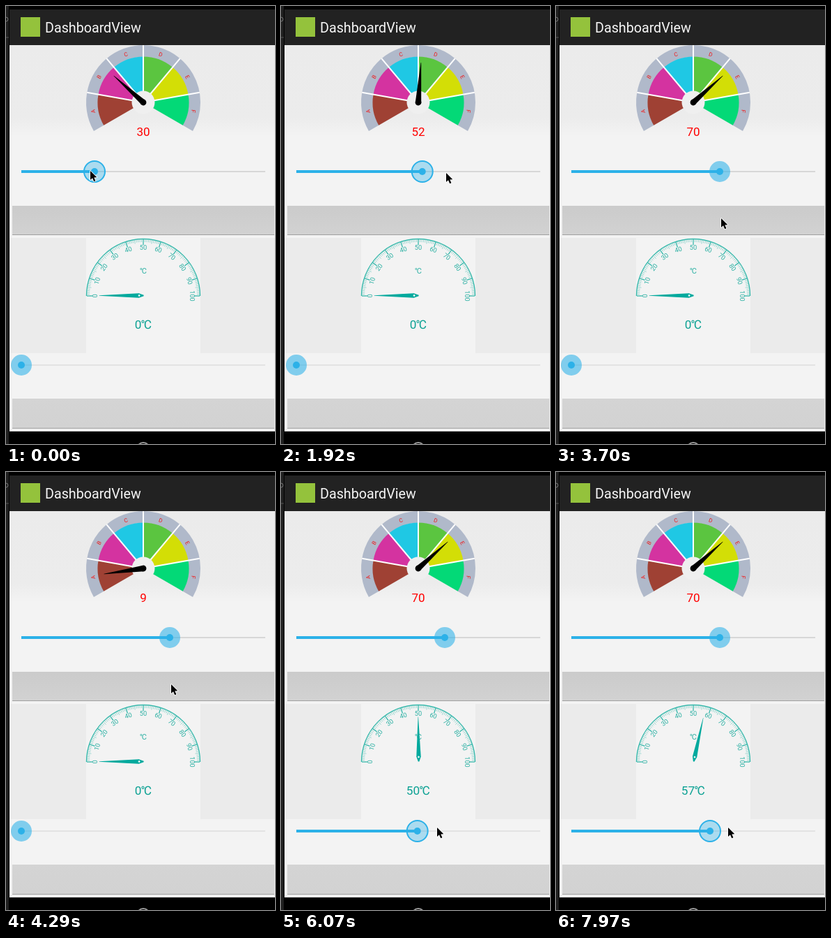
Write an HTML page with a canvas that moves like this. It is 386 px wide and 627 px high and loops after 8000 ms.

```html
<!DOCTYPE html>
<html lang="en">
<head>
<meta charset="utf-8">
<title>Dashboard gauges</title>
<style>
  html, body { margin: 0; width: 100%; height: 100%; overflow: hidden; background: #000; }
  canvas { display: block; width: 386px; height: 627px; }
</style>
</head>
<body>
<canvas id="stage"></canvas>
<script>
const W = 386, H = 627, LOOP = 8000, TICK = 147.6;
const FONT = 'Roboto, "Noto Sans", "Noto Sans CJK SC", sans-serif';
const BLUE = '#2cb1e8', TEAL = '#00a99d', RIM = '#35b8ab';
const canvas = document.getElementById('stage');
const ctx = canvas.getContext('2d');
const dpr = window.devicePixelRatio || 1;
canvas.width = W * dpr;
canvas.height = H * dpr;

// Turning points as [tick, position]; the motion eases from one to the next.
const thumb1 = [[0, 127], [4, 53], [8, 211], [11, 106], [14, 235]];
const thumb2 = [[37, 22], [42, 214], [44, 106], [47, 237], [51, 95], [54, 221]];
const mouseX = [[0, 121], [3, 53], [6.6, 224], [9.6, 106], [13, 237], [29, 237], [33, 60],
  [36, 25], [37, 25], [41, 224], [43, 106], [46, 245], [50, 95], [54, 247]];
const mouseY = [[0, 236], [8, 239], [14, 239], [16, 304], [29, 304], [33, 545], [36, 509]];
const PRESSES = [17, 27];

const rad = deg => deg * Math.PI / 180;
const percent = x => (x - 22) / 3.5;
const ease = u => (1 - Math.cos(Math.PI * Math.min(1, Math.max(0, u)))) / 2;

function swing(points, t) {
  const next = points.findIndex(p => p[0] > t);
  if (next < 0) return points[points.length - 1][1];
  if (next === 0) return points[0][1];
  const [a, va] = points[next - 1], [b, vb] = points[next];
  return va + (vb - va) * ease((t - a) / (b - a));
}

// Each press of the button runs the needle from 0 to 70.
function needleValue(t, x) {
  const press = PRESSES.filter(p => p < t).pop();
  return press ? 70 * ease((t - press - .4) / 6.8) : percent(x);
}

function rect(x, y, w, h, fill) {
  ctx.fillStyle = fill;
  ctx.fillRect(x, y, w, h);
}

function disc(x, y, r, fill) {
  ctx.fillStyle = fill;
  ctx.beginPath();
  ctx.arc(x, y, r, 0, 2 * Math.PI);
  ctx.fill();
}

function arc(x, y, r, from, to, color, width) {
  ctx.strokeStyle = color;
  ctx.lineWidth = width;
  ctx.beginPath();
  ctx.arc(x, y, r, rad(from), rad(to));
  ctx.stroke();
}

function line(x1, y1, x2, y2, color, width) {
  ctx.strokeStyle = color;
  ctx.lineWidth = width;
  ctx.beginPath();
  ctx.moveTo(x1, y1);
  ctx.lineTo(x2, y2);
  ctx.stroke();
}

function poly(points, fill) {
  ctx.fillStyle = fill;
  ctx.beginPath();
  points.forEach(([x, y]) => ctx.lineTo(x, y));
  ctx.closePath();
  ctx.fill();
}

function text(s, x, y, size, color, align = 'center') {
  ctx.font = `${size}px ${FONT}`;
  ctx.textAlign = align;
  ctx.fillStyle = color;
  ctx.fillText(s, x, y);
}

function gradient(y1, y2, ...stops) {
  const g = ctx.createLinearGradient(0, y1, 0, y2);
  stops.forEach(([p, c]) => g.addColorStop(p, c));
  return g;
}

// Draws with the x axis along the given angle.
function turned(x, y, deg, draw) {
  ctx.save();
  ctx.translate(x, y);
  ctx.rotate(rad(deg));
  draw();
  ctx.restore();
}

function rimText(s, x, y, deg, r, size, color) {
  turned(x, y, deg + 90, () => text(s, 0, -r, size, color));
}

function backdrop() {
  rect(0, 0, W, H, '#000');
  rect(0, 0, 4, H, '#202020');
  arc(0, 19, 3, -90, 90, '#777', 1);
  line(0, 45, 4, 45, '#555', 1);
  rect(5, 5, 381, 51, '#222');
  rect(21, 16, 28, 28, '#94c23c');
  text('DashboardView', 56, 38, 19.7, '#f5f5f5', 'left');
  rect(5, 56, 381, 553, '#f3f3f3');
  rect(5, 56, 381, 130, gradient(56, 186, [0, '#ebebeb'], [.8, '#ececec'], [1, '#f3f3f3']));
  rect(5, 332, 110, 165, '#ebebeb');
  rect(279, 332, 107, 165, '#ebebeb');
  arc(197, 634, 9, 180, 360, '#9a9a9a', 2);
}

function button(y, h, top, bottom, pressed) {
  if (pressed) {
    ctx.fillStyle = '#a5d7ec';
    ctx.beginPath();
    ctx.roundRect(5, y - 5, 384, h + 9, 3);
    ctx.fill();
  }
  rect(9, y, 376, h, pressed ? '#45b9ea' : gradient(y, y + h, [0, top], [1, bottom]));
  rect(9, y + h - 1, 376, 1, pressed ? '#3a9bc6' : '#a0a0a0');
}

function slider(x, y, pressed, track) {
  line(22, y, 372, y, track, 1.4);
  line(22, y, x, y, BLUE, 4);
  disc(x, y, 15, `rgba(44, 177, 232, ${pressed ? .36 : .58})`);
  if (pressed) arc(x, y, 15, 0, 360, BLUE, 2);
  disc(x, y, 5, BLUE);
}

function colorGauge(value) {
  const x = 197, y = 138;
  const colors = ['#9f4134', '#d433a0', '#1fc8e4', '#5bc540', '#d3de06', '#03d977'];
  arc(x, y, 73.5, 150, 390, '#b0b9ca', 17);
  colors.forEach((c, i) => {
    const from = 150 + 40 * i;
    arc(x, y, 38, from, from + 40, c, 55);
    rimText('ABCDEF'[i], x, y, from + 20, 70.3, 8, '#f01818');
  });
  for (let a = 190; a < 390; a += 40) {
    turned(x, y, a, () => line(0, 0, 82, 0, '#fff', 2));
  }
  disc(x, y, 16.5, '#efefef');
  turned(x, y, 150 + 2.4 * value, () => {
    poly([[0, -4.2], [57, -.3], [57, .3], [0, 4.2]], '#000');
    disc(0, 0, 4.4, '#000');
  });
  text(Math.round(value), x, 185.5, 17, '#f00');
}

function scaleGauge(value) {
  const x = 197, y = 415;
  arc(x, y, 81.5, 180, 360, RIM, 1.4);
  for (let i = 0; i <= 100; i++) {
    const major = i % 10 === 0;
    const size = major ? 8 : i % 5 === 0 ? 5.5 : 4;
    const angle = 180 + 1.8 * i;
    turned(x, y, angle, () =>
      line(81 - size, 0, 81, 0, major ? RIM : '#8ad2ca', major ? 1.3 : .8));
    if (major) rimText(i, x, y, angle, 66.5, 9.2, '#2bb0a3');
  }
  text('℃', x, 383, 11, '#2bb0a3');
  turned(x + .6, y - .5, 180 + 1.8 * value, () => {
    poly([[0, -.8], [7, -3.2], [64, -.2], [64, .2], [7, 3.2], [0, .8]], TEAL);
    disc(6.5, 0, 1.4, '#e4f4f2');
  });
  text(Math.round(value) + '℃', x, 462, 17.2, '#0ba193');
}

function cursor(x, y) {
  ctx.save();
  ctx.translate(x, y);
  ctx.scale(.93, .93);
  ctx.strokeStyle = '#fff';
  ctx.lineWidth = 1.8;
  ctx.lineJoin = 'round';
  poly([[0, 0], [0, 14], [3.2, 11], [5.6, 16.4], [8, 15.4], [5.7, 10.2], [10, 10]], '#000');
  ctx.stroke();
  ctx.fill();
  ctx.restore();
}

function draw(ms) {
  const t = Math.floor((ms + 8) / TICK);
  const x1 = swing(thumb1, t), x2 = swing(thumb2, t);
  ctx.setTransform(dpr, 0, 0, dpr, 0, 0);
  backdrop();
  button(286, 42, '#cbcbcb', '#d2d2d2', PRESSES.includes(t));
  button(562, 43, '#d4d4d4', '#d2d2d2', false);
  colorGauge(needleValue(t, x1));
  scaleGauge(percent(x2));
  slider(x1, 237, t < 15, '#cecece');
  slider(x2, 514, t > 36, '#dedede');
  cursor(swing(mouseX, t), swing(mouseY, t));
}

const start = performance.now();
function loop() {
  draw((performance.now() - start) % LOOP);
  requestAnimationFrame(loop);
}
loop();
</script>
</body>
</html>
```
